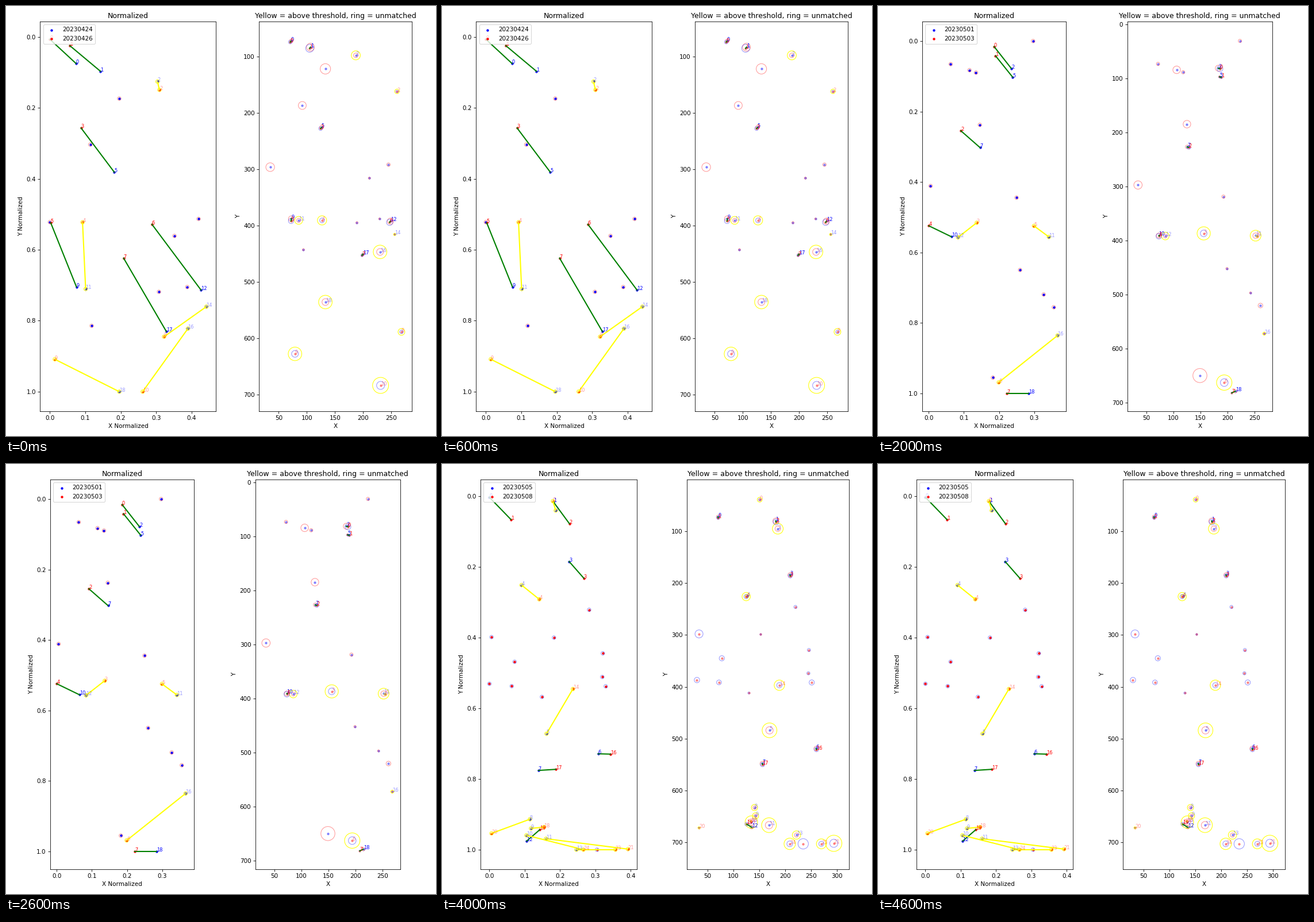
Animation, 748 px wide and 748 px high, one loop 5000 ms. Source, as a matplotlib script:

```python
import matplotlib.pyplot as plt
import numpy as np
from matplotlib.animation import FuncAnimation
from matplotlib.patches import Circle
from matplotlib.ticker import MultipleLocator

SIZE, DPI = 748, 74.8
TOP, BOTTOM = 27.1, 704.7
FADE = 0.4
COLORS = ("blue", "red")
DATES = dict(A="20230424", B="20230426", C="20230501",
             D="20230503", E="20230505", F="20230508")
CENTERS = [(212.4, 572.9), (201.2, 558.6), (201.8, 559.8),
           (199.2, 548.9), (203, 567.2)]

# Spots are (x, y, radius), the radius being 3 if left out.
DRIFT = dict(A=(0.5, -1), B=(-1, 1), C=(0, 0),
             D=(3, 1), E=(-1, -1.5), F=(-0.5, 0.5))
RECURRING = [
    ("ABCEF", 71.5, 73.5), ("ABC", 106, 84.5, 7), ("CDEF", 183, 81.5, 5.5),
    ("CD", 185.5, 97.5, 2), ("ABCD", 125.5, 227, 3.3),
    ("ACF", 34.5, 297.5, 7.7), ("BCF", 73, 391, 4.6), ("AC", 85, 392, 3.5),
    ("AB", 248, 393.5, 5.5), ("CF", 252, 391.2, 5), ("ABC", 199, 452, 2),
    ("EF", 210.5, 185.5, 4), ("CEF", 261, 520.5, 4.3), ("EF", 157, 549.5, 4.2),
]
SINGLE = dict(
    A=[(187, 98, 4), (133, 122, 9.2), (92, 187, 7), (245, 292),
       (211, 316, 1.8), (72.5, 388, 5), (229, 388.2, 1.5), (189, 395, 1.8),
       (256, 416, 1), (94, 443, 1.8), (230, 447, 6), (133, 536, 6)],
    B=[(260, 162, 2), (127, 391, 4.1), (268, 589), (79, 628, 6),
       (231, 684, 7.1)],
    C=[(223, 31), (118, 89), (125, 185, 7), (192.5, 319), (242.5, 497, 1.8),
       (268, 572.5, 1.4), (149, 650, 13), (214.5, 679, 3.1)],
    D=[(156, 387, 6.1), (73, 392.2, 5.2), (255, 392.5, 1), (194, 663, 7.1),
       (208, 682, 1)],
    E=[(186, 95, 5.2), (126.5, 225, 1.7), (170, 484, 7.1), (141, 633),
       (143, 649), (135, 661, 6), (169, 667, 7.1), (135.5, 671),
       (222, 686, 4)],
    F=[(151, 39, 2.3), (125, 226, 4), (220, 246), (153, 299, 1.5), (246, 329),
       (78, 345, 5), (245, 374), (30, 387, 5.2), (189, 397, 5),
       (130, 412, 1.8), (134, 660, 0.7), (126, 665, 3.5), (34, 672, 1),
       (294, 702, 7.8), (235, 703, 10), (270, 703, 4.8), (209, 703, 5.5)],
)

MAX_SHIFT, MAX_GROWTH = 17, 2.2   # limits for a match below the threshold
SIZE_WEIGHT, MAX_RADIUS = 15, 9   # cost of a match above it


def spots(day):
    """All spots of a day, numbered from top to bottom."""
    dx, dy = DRIFT[day]
    found = [(x + dx, y + dy, *r) for seen, x, y, *r in RECURRING
             if day in seen]
    found = [(x, y, *(r or [3])) for x, y, *r in found + SINGLE[day]]
    return np.array(sorted(found, key=lambda s: s[1]), float)


def match_near(a, b):
    """Pair the closest spots of similar size first."""
    shift = np.hypot(*(a[:, None, :2] - b[None, :, :2]).transpose(2, 0, 1))
    growth = abs(a[:, None, 2] - b[None, :, 2])
    ok = (shift < MAX_SHIFT) & (growth < MAX_GROWTH)
    pairs = []
    for i, j in sorted(zip(*np.nonzero(ok)), key=lambda p: shift[p]):
        if all(i != p and j != q for p, q in pairs):
            pairs.append((i, j))
    return pairs


def match_far(a, b, near):
    """Cheapest assignment of the spots left over."""
    rest = [[i for i in range(len(day)) if day[i, 2] < MAX_RADIUS
             and i not in {p[k] for p in near}]
            for k, day in enumerate((a, b))]
    swap = len(rest[0]) < len(rest[1])
    many, few = rest[::-1] if swap else rest
    best = {0: (0, [])}
    for i in many:
        grown = dict(best)
        for mask, (cost, pairs) in best.items():
            for bit, j in enumerate(few):
                if mask >> bit & 1:
                    continue
                p = (j, i) if swap else (i, j)
                step = (a[p[0]] - b[p[1]]) * (1, 1, SIZE_WEIGHT)
                total = cost + np.linalg.norm(step)
                key = mask | 1 << bit
                if key not in grown or total < grown[key][0]:
                    grown[key] = total, pairs + [p]
        best = grown
    return best[2 ** len(few) - 1][1]


def normalize(day):
    xy = day[:, :2]
    return (xy - xy.min()) / (xy.max() - xy.min())


def make_scene(first, second):
    days = spots(first), spots(second)
    near = match_near(*days)
    return (DATES[first], DATES[second]), days, near, match_far(*days, near)


SCENES = [make_scene(*pair) for pair in zip("ABCDE", "BCDEF")]

fig, (left, right) = plt.subplots(1, 2, figsize=(SIZE / DPI, SIZE / DPI),
                                  dpi=DPI)


def ring(ax, xy, radius, color, alpha=1):
    ax.add_patch(Circle(xy, radius, fill=False, ec=color, alpha=alpha, lw=1))


def link(ax, a, b, color):
    ax.plot([a[0], b[0]], [a[1], b[1]], color=color, lw=2)


def label(ax, xy, index, color, alpha):
    ax.text(xy[0], xy[1], str(index), color=color, alpha=alpha, fontsize=8)


def finish(ax, center, title, xlabel, ylabel, xstep, ystep):
    width = 360
    ax.set_position([(center - width / 2) / SIZE, 1 - BOTTOM / SIZE,
                     width / SIZE, (BOTTOM - TOP) / SIZE])
    ax.set_aspect("equal", adjustable="box")
    ax.autoscale_view()
    ax.invert_yaxis()
    ax.xaxis.set_major_locator(MultipleLocator(xstep))
    ax.yaxis.set_major_locator(MultipleLocator(ystep))
    ax.set_title(title)
    ax.set_xlabel(xlabel)
    ax.set_ylabel(ylabel)


def draw(i):
    names, days, near_pairs, far_pairs = SCENES[i]
    left.clear()
    right.clear()
    norm = [normalize(d) for d in days]

    for k, day in enumerate(days):
        color, other = COLORS[k], COLORS[1 - k]
        near = {pair[k] for pair in near_pairs}
        far = {pair[k] for pair in far_pairs}
        left.scatter(*norm[k].T, s=10, color=color, label=names[k])
        right.scatter(day[:, 0], day[:, 1], s=10, color=color, alpha=FADE)
        for j, (x, y, r) in enumerate(day):
            ring(right, (x, y), r, other, FADE)
            if j in far:
                ring(right, (x, y), 2 * r, "yellow")
                ring(left, norm[k][j], 0.005, "yellow")
            elif j not in near:
                ring(left, norm[k][j], 0.005, other, FADE)
            if j in near or j in far:
                alpha = 1 if j in near else FADE
                label(left, norm[k][j], j, color, alpha)
                label(right, (x, y), j, color, alpha)

    for a, b in near_pairs:
        link(left, norm[0][a], norm[1][b], "green")
        link(right, days[0][a], days[1][b], "green")
    for a, b in far_pairs:
        link(left, norm[0][a], norm[1][b], "yellow")

    left.legend(loc="upper left")
    finish(left, CENTERS[i][0], "Normalized",
           "X Normalized", "Y Normalized", 0.1, 0.2)
    finish(right, CENTERS[i][1],
           "Yellow = above threshold, ring = unmatched", "X", "Y", 50, 100)
    return []


anim = FuncAnimation(fig, draw, frames=len(SCENES), init_func=lambda: [],
                     interval=1000, repeat=True, repeat_delay=0)
plt.show()
```
